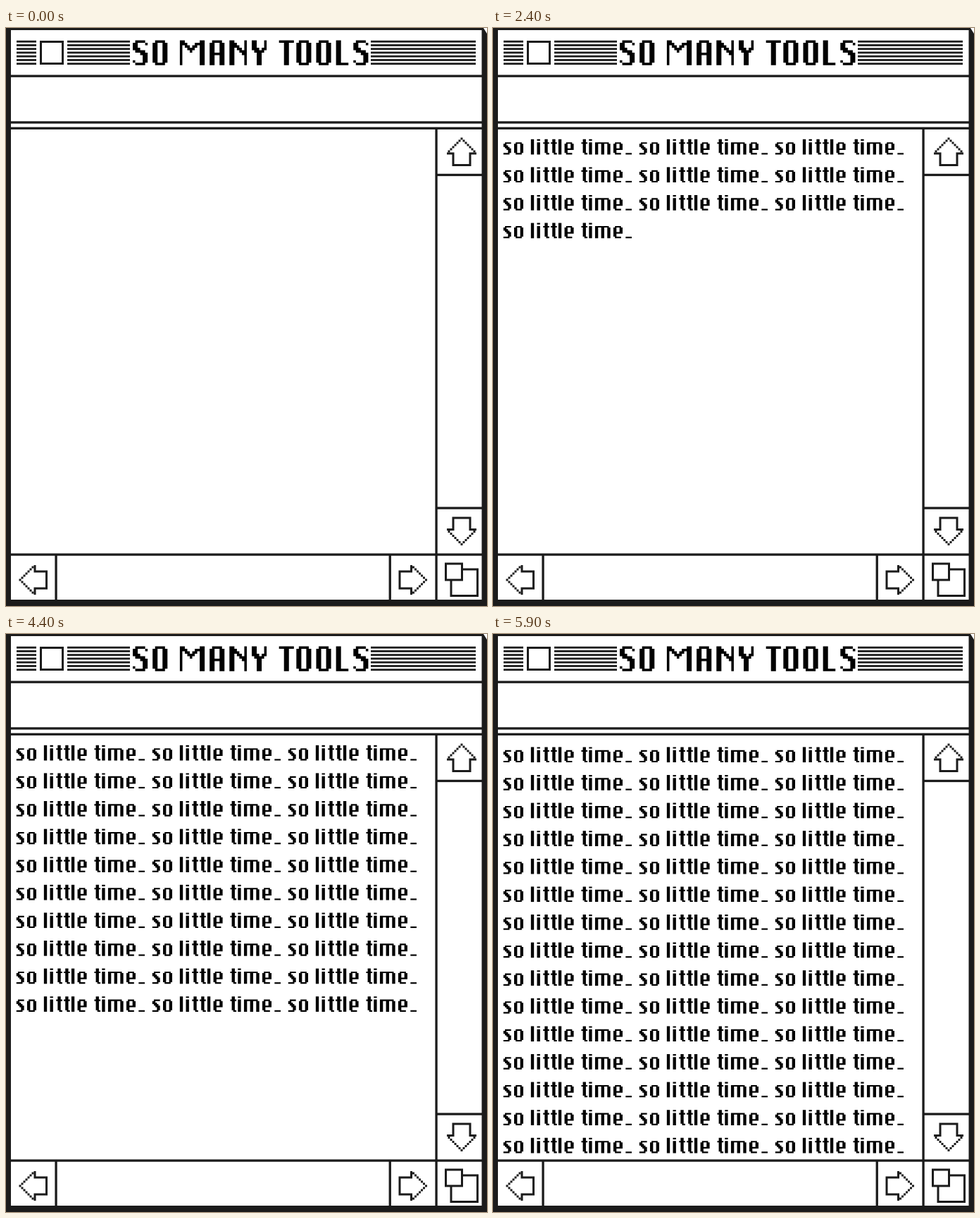
An HTML page that plays this animation: 683 px wide and 820 px high, repeating every 6.9 s.

```html
<!DOCTYPE html>
<html lang="en">
<head>
<meta charset="utf-8">
<title>So many tools</title>
<style>
  html, body { margin: 0; width: 100%; height: 100%; overflow: hidden; background: #fff; }
  svg { display: block; width: 683px; height: 820px; }
  text { font-family: "Liberation Sans", sans-serif; font-weight: bold; fill: transparent; }
</style>
</head>
<body>
<svg id="stage" viewBox="0 0 683 820">
  <rect width="683" height="820" fill="#fff"/>
  <g id="frame" fill="#1b1b1b"></g>
  <g id="icons" fill="none" stroke="#1b1b1b" stroke-width="3">
    <rect x="49.5" y="19.5" width="31" height="31"/>
    <rect x="632" y="768" width="37.5" height="37.5"/>
    <rect x="624.5" y="760" width="23" height="23" fill="#fff"/>
  </g>
  <g id="title"></g>
  <g id="page"></g>
</svg>
<script>
const NS = "http://www.w3.org/2000/svg";
const LOOP = 6900;
const PHRASE = "so little time_";
const COLS = 3, ROWS = 15;
const COL_STEP = 193, ROW_STEP = 39.6;
const SPACE = 3;

// Each letter: advance in font pixels, then its outline on a 10-pixel-high grid.
const LETTERS = {
  s: [7, "M1 2h4v1h-3v1h1v1h1v1h1v3h-1v1h-4v-1h3v-2h-1v-1h-1v-1h-1v-2h1z"],
  o: [8, "M1 2h4v1h1v6h-1v1h-4v-1h-1v-6h1zM2 3v6h2v-6z"],
  l: [4, "M0 0h2v10h-2z"],
  i: [4, "M0 0h2v1h-2zM0 2h2v8h-2z"],
  t: [5, "M1 0h2v2h1v1h-1v6h1v1h-2v-1h-1v-6h-1v-1h1z"],
  e: [8, "M1 2h4v1h1v4h-4v2h3v1h-4v-1h-1v-6h1zM2 3v3h2v-3z"],
  m: [12, "M0 2h9v1h1v7h-2v-7h-2v7h-2v-7h-2v7h-2z"],
  _: [6, "M0 9h4v1h-4z"],
  S: [8, "M1 0h4v1h1v1h-1v-1h-3v2h1v1h2v1h1v4h-1v1h-4v-1h-1v-1h1v1h3v-3h-1v-1h-2v-1h-1v-3h1z"],
  O: [8, "M1 0h4v1h1v8h-1v1h-4v-1h-1v-8h1zM2 1v8h2v-8z"],
  M: [12, "M0 0h2v1h1v1h1v1h1v-1h1v-1h2v-1h2v10h-2v-8h-1v1h-1v1h-1v1h-1v-1h-1v-1h-1v-1h-1v8h-1z"],
  A: [8, "M1 0h4v1h1v9h-2v-4h-2v4h-2v-9h1zM2 1v4h2v-4z"],
  N: [9, "M0 0h2v1h1v1h1v1h1v1h1v-4h1v10h-1v-4h-1v-1h-1v-1h-1v-1h-1v7h-2z"],
  Y: [8, "M0 0h2v3h1v1h1v-1h1v-3h1v4h-1v1h-1v5h-2v-5h-1v-1h-1z"],
  T: [7, "M0 0h6v1h-2v9h-2v-9h-2z"],
  L: [7, "M0 0h2v9h3v1h-5z"]
};

const byId = id => document.getElementById(id);

function add(parent, tag, attrs) {
  const el = document.createElementNS(NS, tag);
  for (const key in attrs) el.setAttribute(key, attrs[key]);
  return parent.appendChild(el);
}

function box(x, y, width, height) {
  add(byId("frame"), "rect", { x, y, width, height });
}

// Pixel lettering over a selectable line of text.
function write(parent, words, x, y, unit) {
  const g = add(parent, "g", { transform: `translate(${x} ${y}) scale(${unit})` });
  add(g, "text", { y: 10, "font-size": 11 }).textContent = words;
  let pen = 0;
  for (const ch of words) {
    if (ch === " ") { pen += SPACE; continue; }
    const [advance, d] = LETTERS[ch];
    add(g, "path", { d, transform: `translate(${pen} 0)` });
    pen += advance;
  }
  return g;
}

function arrow(x, y, angle) {
  const g = add(byId("icons"), "g", { transform: `translate(${x} ${y}) rotate(${angle})` });
  add(g, "path", { d: "M-21 21H-12V37.5H12V21H21" });
  let d = "";
  for (let k = -6; k <= 6; k++) d += `M${3 * k - 1.5} ${3 * Math.abs(k)}h3`;
  add(g, "path", { d });
}

function drawWindow() {
  // outer border
  box(0, 0, 683, 3);
  box(0, 0, 7, 820);
  box(675.5, 0, 7.5, 820);
  box(0, 811, 683, 9);
  add(byId("frame"), "path", { d: "M678 0H683V8z", fill: "#fff" });
  // horizontal rules
  for (const y of [66.5, 132.3, 140.6, 745.4]) box(6, y, 671, 3.3);
  for (const y of [206.8, 679.4]) box(611, y, 66, 3.3);
  // vertical rules
  box(609.4, 142, 3.3, 670);
  for (const x of [69.4, 543.6]) box(x, 746, 3.3, 66);
  // title bar stripes
  for (let i = 0; i < 7; i++) {
    for (const [x, end] of [[15, 43], [87, 176], [518, 667]]) {
      box(x, 17.8 + 5.25 * i, end - x, 2.8);
    }
  }
  arrow(647, 157, 0);
  arrow(647, 732.5, 180);
  arrow(20, 783, -90);
  arrow(596.5, 783, 90);
}

drawWindow();
write(byId("title"), "SO MANY TOOLS", 180, 17.5, 3.52);

const page = byId("page");
const phrases = [];
for (let n = 0; n < COLS * ROWS; n++) {
  const x = 14.8 + (n % COLS) * COL_STEP;
  const y = 157.8 + Math.floor(n / COLS) * ROW_STEP;
  phrases.push(write(page, PHRASE, x, y, 2.169));
}

function countAt(t) {
  if (t < 1000) return 0;
  if (t < 1500) return 1;
  if (t < 1700) return 2;
  return Math.min(phrases.length, 3 + Math.floor((t - 1700) / 100));
}

function render(t) {
  const count = countAt(t);
  phrases.forEach((p, n) => p.setAttribute("display", n < count ? "inline" : "none"));
  // the page settles lower once its last row begins
  const drop = count > COLS * (ROWS - 1) ? 2.6 : 0;
  page.setAttribute("transform", `translate(0 ${drop})`);
}

const start = performance.now();
function tick() {
  render((performance.now() - start) % LOOP);
  requestAnimationFrame(tick);
}
tick();
</script>
</body>
</html>
```
